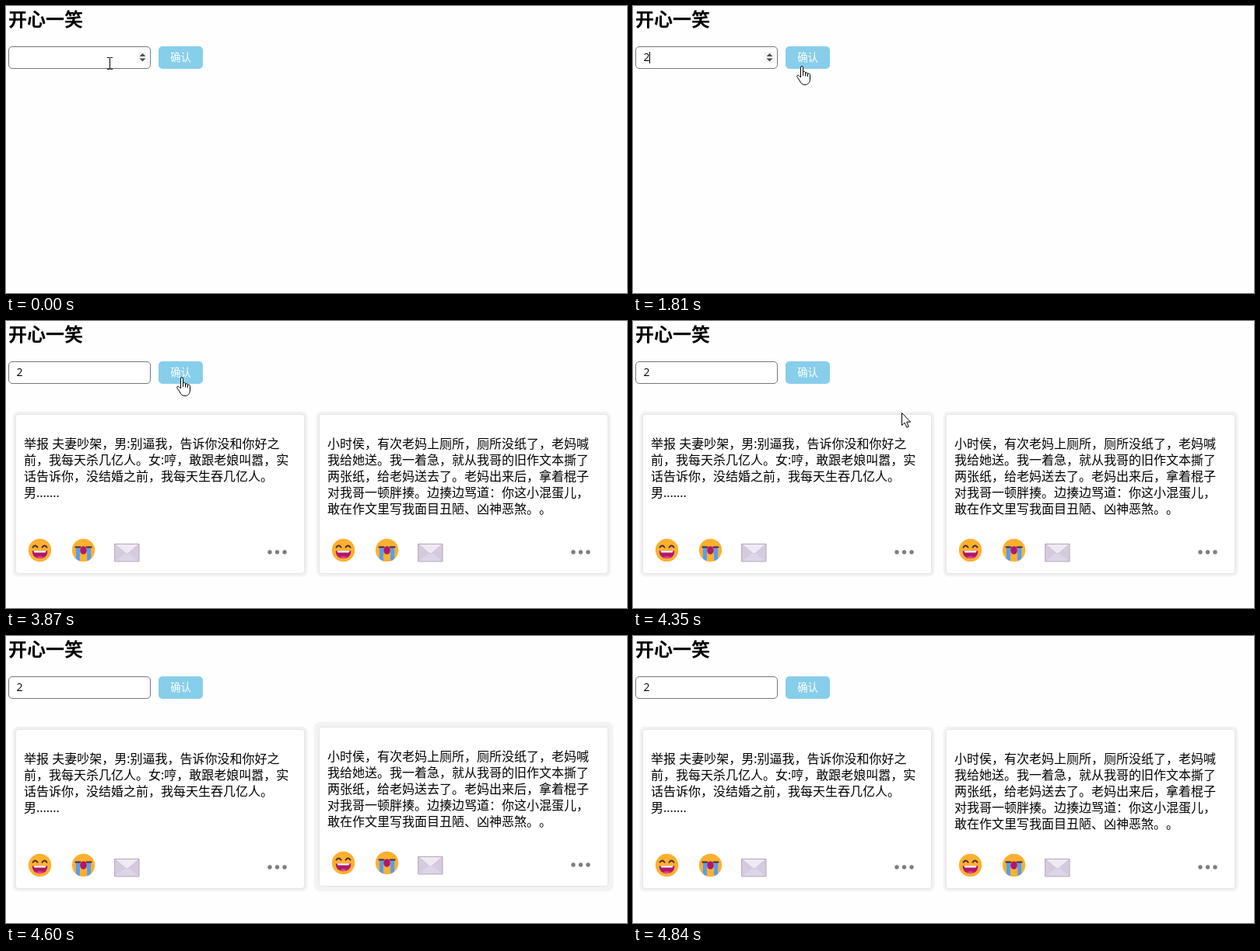
Write an HTML page that moves like this. It is 798 by 370 pixels and loops after 5.66 s.

```html
<!DOCTYPE html>
<html lang="zh-CN">
<head>
<meta charset="utf-8">
<title>开心一笑</title>
<style>
html, body { margin: 0; width: 100%; height: 100%; overflow: hidden; background: #fefefe; }
body { position: relative; color: #000; font-family: "Open Sans", "Noto Sans CJK SC", "Noto Sans CJK", sans-serif; text-spacing-trim: space-all; }
body > *, .card > * { position: absolute; box-sizing: border-box; margin: 0; white-space: nowrap; }
h1 { left: 3px; top: 1px; font-size: 24px; line-height: 32px; font-weight: 700; }
.field { left: 3px; top: 52px; width: 183px; height: 29px; border: 1px solid #767676; border-radius: 5px; background: #fff; }
.value { left: 13.5px; top: 56px; font-size: 14px; line-height: 20px; }
.caret { left: 14px; top: 59px; width: 1px; height: 15px; background: #000; }
.spin { left: 168px; top: 59px; width: 15px; height: 15px; background: #f6f6f6; }
.button { left: 196px; top: 52px; width: 57px; height: 29px; border-radius: 5px; background: #87ceeb; color: #fff; font-size: 13.333px; line-height: 29px; text-align: center; }
.card { --lift: 0; left: 13px; top: 121px; width: 370px; height: 204px; border-radius: 3px; background: #fff;
  transform: translateY(calc(var(--lift) * -1px));
  box-shadow: 0 0 3px rgba(0, 0, 0, .14), 0 0 1px calc(4.5px + var(--lift) * 1px) #f3f3f3; }
.card + .card { left: 403px; }
.card p { left: 10px; top: 27px; font-size: 16px; line-height: 21px; }
.card svg { left: 0; top: 154px; }
.pointer { left: 0; top: 0; width: 100%; height: 100%; }
</style>
</head>
<body>
<h1>开心一笑</h1>
<div class="field"></div>
<div class="value">2</div>
<div class="caret"></div>
<svg class="spin" viewBox="0 0 15 15"><path d="M3.5 6 7.5 2l4 4zM3.5 8.5h8l-4 4z" fill="#4d4d4d"/></svg>
<div class="button">确认</div>

<div class="card">
  <p>举报 夫妻吵架，男:别逼我，告诉你没和你好之<br>前，我每天杀几亿人。女:哼，敢跟老娘叫嚣，实<br>话告诉你，没结婚之前，我每天生吞几亿人。<br>男.......</p>
  <svg width="370" height="45">
    <g id="icons" fill="none" stroke-linecap="round" stroke-linejoin="round">
      <g transform="translate(30.5 20.5)">
        <circle r="14.7" fill="#fcb02f"/>
        <path d="M-9-3.8q3-4.4 6 0M3-3.8q3-4.4 6 0" stroke="#4a2a3c" stroke-width="2"/>
        <path d="M-9.8.8H9.8C9.8 7.5 5.8 10.8 0 10.8S-9.8 7.5-9.8.8z" fill="#b0186a"/>
        <path d="M-8.2.8H8.2L7 3H-7z" fill="#fff"/>
        <path d="M-5.5 9.3Q0 6 5.5 9.3Q0 12.2-5.5 9.3z" fill="#e8458b"/>
      </g>
      <g transform="translate(86.5 20.5)">
        <circle r="14.7" fill="#fcb02f"/>
        <path d="M-9.6-3.4h5V13.8q-2.8-.7-5-2.8zM4.6-3.4h5V11q-2.2 2.1-5 2.8z" fill="#559df2"/>
        <path d="M-10.2-4h6.2M4-4h6.2" stroke="#4a2a3c" stroke-width="1.8"/>
        <ellipse rx="4.3" ry="5.3" fill="#b0186a"/>
      </g>
      <g transform="translate(127 12.5)">
        <path d="M0 0h31v22.5H0z" fill="#d5cbdf"/>
        <path d="M0 22.5 15.5 10 31 22.5z" fill="#ddd4e7"/>
        <path d="M0 0h31L17 12q-1.5 1.2-3 0z" fill="#eee9f3" stroke="#c3b8cc" stroke-width=".7"/>
        <path d="M0 0h31v22.5H0z" stroke="#b3a7b8"/>
      </g>
      <g fill="#7d7d7d"><circle cx="326" cy="23" r="2.7"/><circle cx="335.5" cy="23" r="2.7"/><circle cx="345" cy="23" r="2.7"/></g>
    </g>
  </svg>
</div>
<div class="card" id="hovered">
  <p>小时侯，有次老妈上厕所，厕所没纸了，老妈喊<br>我给她送。我一着急，就从我哥的旧作文本撕了<br>两张纸，给老妈送去了。老妈出来后，拿着棍子<br>对我哥一顿胖揍。边揍边骂道：你这小混蛋儿，<br>敢在作文里写我面目丑陋、凶神恶煞。。</p>
  <svg width="370" height="45"><use href="#icons"/></svg>
</div>

<svg class="pointer" fill="#fff" stroke="#000" stroke-linejoin="round">
  <path id="beam" fill="none" d="M-3-7.5h2.5q1 0 1 1V6.5q0 1-1 1H-3M4-7.5H1.5q-1 0-1 1V6.5q0 1 1 1H4"/>
  <path id="arrow" d="M.5.5v16l3.6-3.4 2.7 6.1 2.5-1.1-2.6-5.9h4.9z"/>
  <path id="hand" d="M-1.5 14V1.2a1.5 1.5 0 0 1 3 0V8c0-2 3-2 3 0v1c0-1.6 3-1.6 3 .3v.8c0-1.5 3-1.3 3 .5V16c0 5-3 7.5-6.5 7.5-4 0-5.5-2.5-7-5.5L-6 13.5c-1-2 1-3 2.3-1.7zM1.5 8v4M4.5 9v3.5M7.5 10v3"/>
</svg>

<script>
const LOOP = 5660;
const $ = s => document.querySelector(s);
const show = (el, on) => { el.style.visibility = on ? 'visible' : 'hidden'; };

// Each row starts with the time from which it holds.
const moves = [
  [0, 'beam', 133, 74],
  [1470, 'beam', 135, 75],
  [1530, 'beam', 140, 76],
  [1600, 'beam', 150, 78],
  [1670, 'beam', 168, 79],
  [1740, 'arrow', 192, 79],
  [1810, 'hand', 217, 78],
  [1870, 'hand', 225, 74],
  [2010, 'hand', 226, 73],
  [4290, 'hand', 236, 77],
  [4350, 'arrow', 345, 118],
  [4420, 'arrow', 520, 195],
  [4480, 'arrow', 696, 281],
  [4540, 'arrow', 786, 353],
  [4600, '', 0, 0]
];
const lifts = [[0, 0], [4480, 2], [4540, 3.4], [4600, 3], [4660, 2.2], [4720, 1.3], [4780, .5], [4840, 0]];
const carets = [[0, 0], [810, 14], [1340, 0], [1400, 21], [1930, 0]];
const at = (rows, t) => rows.findLast(row => row[0] <= t);

const cards = document.querySelectorAll('.card');
const pointers = ['beam', 'arrow', 'hand'].map(id => $('#' + id));
const caret = $('.caret'), value = $('.value'), spin = $('.spin'), hovered = $('#hovered');

function draw() {
  const t = performance.now() % LOOP;
  const [, kind, x, y] = at(moves, t);
  for (const p of pointers) {
    show(p, p.id === kind);
    p.setAttribute('transform', `translate(${x} ${y})`);
  }
  const caretX = at(carets, t)[1];
  show(caret, caretX);
  caret.style.left = caretX + 'px';
  show(value, t >= 1400);
  show(spin, t < 2570);
  cards.forEach(card => show(card, t >= 3870));
  hovered.style.setProperty('--lift', at(lifts, t)[1]);
  requestAnimationFrame(draw);
}
draw();
</script>
</body>
</html>
```
